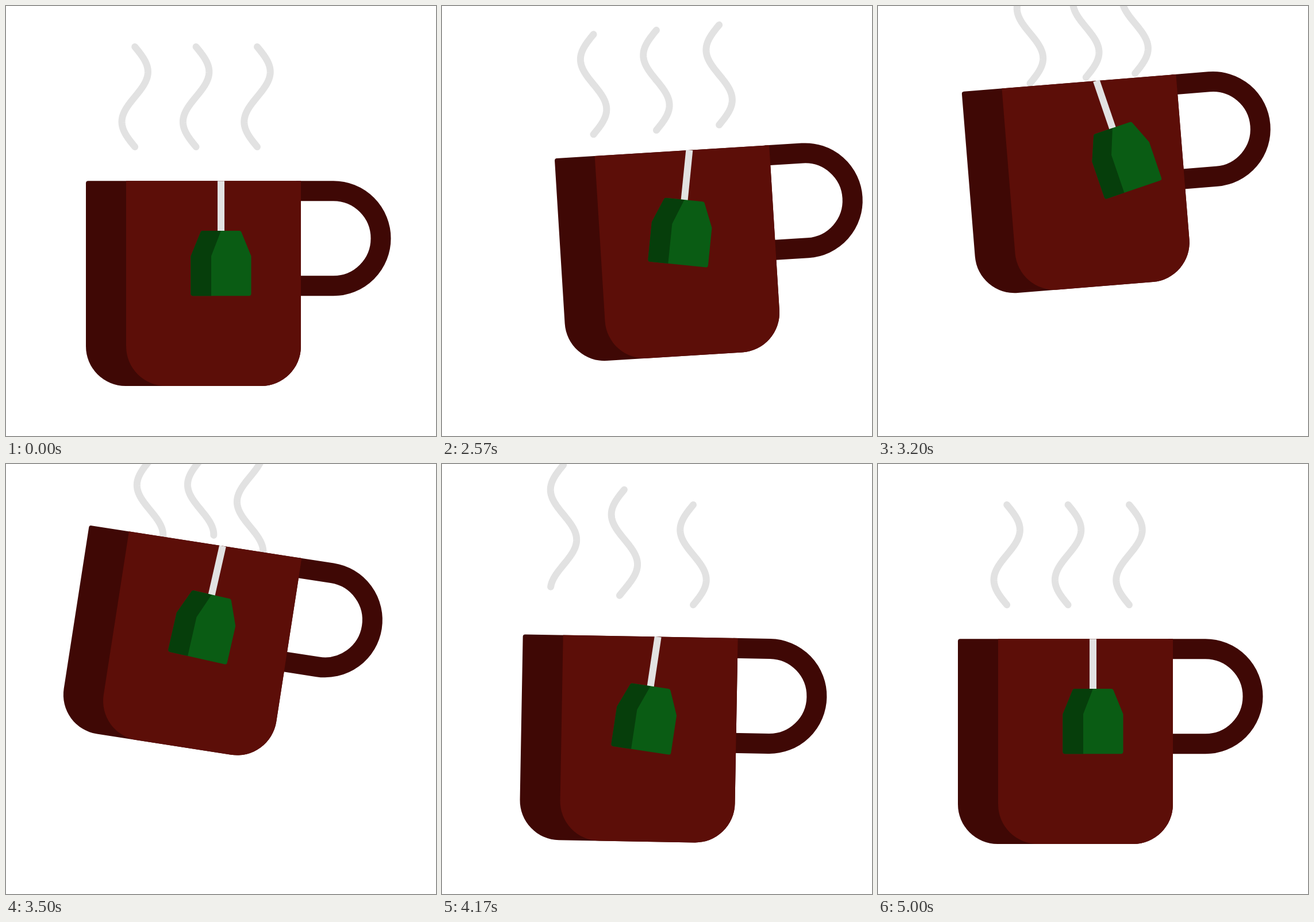
Recreate the animation shown at these times as an HTML page with a canvas. Size 748 px wide and 748 px high, loop 5200 ms.

```html
<!DOCTYPE html>
<html lang="en">
<head>
<meta charset="utf-8">
<title>Tea mug</title>
<style>
html, body { margin: 0; width: 100%; height: 100%; overflow: hidden; background: #fff; }
canvas { display: block; width: 748px; height: 748px; }
</style>
</head>
<body>
<canvas id="stage" width="748" height="748"></canvas>
<script>
const ctx = document.getElementById('stage').getContext('2d');
const LOOP = 5200, START = 2020;
const DARK = '#3f0805', RED = '#5c0e08', PALE = '#e2e2e2';
const GREEN = '#0a5c14', DEEP = '#063e0b';
const CENTER = [326, 482.5], HANG = [374, 304];
const HALF = 87, AMP = 22.7;

const ease = (t, a, b) => {
  const u = Math.min(1, Math.max(0, (t - a) / (b - a)));
  return u * u * (3 - 2 * u);
};

// Rises from 0 to 1 between a and b, falls back between c and d.
const hump = (t, a, b, c, d) => ease(t, a, b) - ease(t, c, d);

// The mug sways right, up, left and down again.
const mugPose = t => ({
  x: CENTER[0] + 72 * hump(t, 0, 650, 735, 1625) - 31 * hump(t, 735, 1625, 1700, 2220),
  y: CENTER[1] - 174 * hump(t, 150, 1270, 1420, 2230),
  turn: -9.7 * hump(t, 250, 985, 985, 1580) + 10.3 * hump(t, 985, 1580, 1580, 2290)
});

// The bag swings like a pendulum that calms down.
const bagTurn = t =>
  6.2 * hump(t, 0, 500, 500, 1150) - 19.3 * hump(t, 500, 1150, 1150, 1700) +
  30 * hump(t, 1150, 1700, 1700, 2500) - 6 * hump(t, 1700, 2500, 2500, 2750) +
  3 * hump(t, 2500, 2750, 2750, 2980);

// The further left a plume stands, the more it lags behind the mug.
function steamPose(lag, t) {
  const fall = 1155 + 255 * Math.sqrt(lag);
  const out = 650 + 200 * lag, left = 1600 + 350 * lag;
  return {
    x: 437 - 106.4 * lag +
      (46 - 2 * lag) * hump(t, 0, 600 + 25 * lag, out, left) -
      15 * hump(t, out, left, 1750 + 300 * lag, 2150 + 375 * lag),
    y: 71 - (128 - 5 * lag) * hump(t, 200 + 25 * lag, 1170 + 90 * lag, fall, fall + 960)
  };
}

// Half-wave shifts: start, duration, extra delay per lag.
const FLIPS = [[40, 450, 10], [1200, 550, 10], [1730, 410, 100], [2300, 490, 40]];

function drawSteam(lag, t) {
  const { x, y: base } = steamPose(lag, t);
  let phase = 0, stretch = 0;
  for (const [start, time, delay] of FLIPS) {
    const a = start + delay * lag, u = ease(t, a, a + time);
    phase += u;
    stretch += HALF * Math.min(4 * u, 1) * (1 - u);
  }
  ctx.strokeStyle = PALE;
  ctx.lineWidth = 12;
  ctx.lineCap = ctx.lineJoin = 'round';
  ctx.beginPath();
  for (let d = 2 * HALF; d >= -stretch; d--) {
    ctx.lineTo(x + AMP * Math.sin(Math.PI * (d / HALF - phase)), base + d);
  }
  ctx.stroke();
}

function drawMug() {
  ctx.strokeStyle = DARK;
  ctx.lineWidth = 35;
  ctx.lineCap = 'butt';
  ctx.beginPath();
  ctx.moveTo(505, 321.75);
  ctx.arc(569.5, 404.25, 82.5, -Math.PI / 2, Math.PI / 2);
  ctx.lineTo(505, 486.75);
  ctx.stroke();
  block(DARK, 139, 374, 4);
  block(RED, 209, 304, 0);
}

function block(color, x, w, corner) {
  ctx.fillStyle = color;
  ctx.beginPath();
  ctx.roundRect(x, 304.3, w, 356.7, [corner, 0, 69, 69]);
  ctx.fill();
}

function drawBag() {
  ctx.fillStyle = PALE;
  ctx.fillRect(368, 304.3, 12, 88);
  ctx.beginPath();
  ctx.moveTo(374, 391);
  ctx.arcTo(408.5, 391, 426.5, 435, 4);
  ctx.lineTo(426.5, 435);
  ctx.arcTo(426.5, 504.3, 374, 504.3, 4);
  ctx.arcTo(321.5, 504.3, 321.5, 435, 4);
  ctx.lineTo(321.5, 435);
  ctx.arcTo(339.5, 391, 374, 391, 4);
  ctx.closePath();
  ctx.fillStyle = GREEN;
  ctx.fill();
  // shaded side
  ctx.clip();
  ctx.fillStyle = DEEP;
  ctx.beginPath();
  ctx.moveTo(374, 391);
  ctx.lineTo(357, 435);
  ctx.lineTo(357, 510);
  ctx.lineTo(315, 510);
  ctx.lineTo(315, 391);
  ctx.fill();
}

// Places a part so that its pivot lands on (x, y), turned by deg.
function place(pivot, x, y, deg, draw) {
  ctx.save();
  ctx.translate(x, y);
  ctx.rotate(deg * Math.PI / 180);
  ctx.translate(-pivot[0], -pivot[1]);
  draw();
  ctx.restore();
}

function render(t) {
  ctx.fillStyle = '#fff';
  ctx.fillRect(0, 0, 748, 748);
  for (let lag = 0; lag < 3; lag++) drawSteam(lag, t);
  const { x, y, turn } = mugPose(t);
  place(CENTER, x, y, turn, drawMug);
  const a = turn * Math.PI / 180, cos = Math.cos(a), sin = Math.sin(a);
  const hx = HANG[0] - CENTER[0], hy = HANG[1] - CENTER[1];
  place(HANG, x + hx * cos - hy * sin, y + hx * sin + hy * cos, bagTurn(t), drawBag);
}

const begin = performance.now();
function tick() {
  const t = (performance.now() - begin) % LOOP;
  render(Math.max(0, t - START));
  requestAnimationFrame(tick);
}
tick();
</script>
</body>
</html>
```
